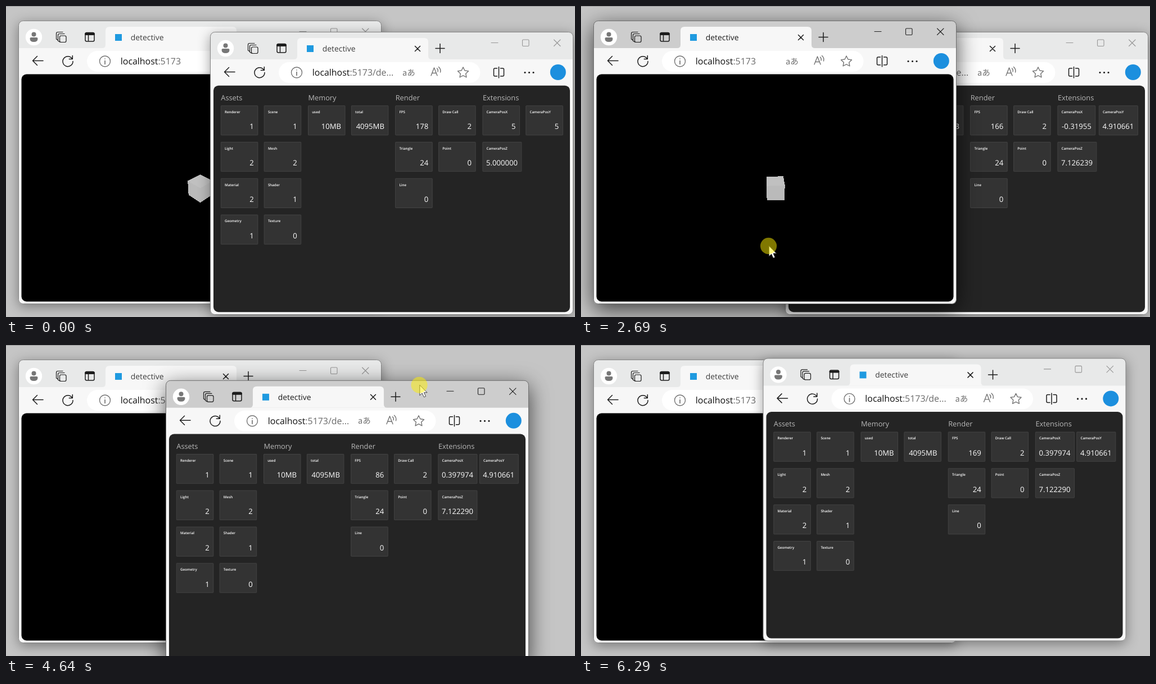
These frames come from a looping animation (1012 by 554 pixels, 6360 ms). An HTML page:

```html
<!DOCTYPE html>
<html lang="en">
<head>
<meta charset="utf-8">
<title>detective</title>
<style>
html, body { margin: 0; width: 100%; height: 100%; overflow: hidden; background: #c5c5c5; }
svg { display: block; width: 1012px; height: 554px; font-family: "Open Sans", "Noto Sans", sans-serif; text-rendering: geometricPrecision; }
.shadow { fill: #c5c5c5; filter: drop-shadow(0 5px 11px rgba(0,0,0,.4)); }
.active .shadow { filter: drop-shadow(0 10px 19px rgba(0,0,0,.7)); }
.bar { fill: #e8e9e9; }
.active .bar { fill: #cdcdcd; }
.sheet { fill: #f7f7f7; }
.edge { fill: none; stroke: #858585; }
.active .edge { stroke: #6e6e6e; }
.icon { fill: none; stroke: #1c1c1c; stroke-width: 1.5; stroke-linecap: round; stroke-linejoin: round; }
.soft { stroke: #737373; stroke-width: 1.4; }
.controls { stroke: #969696; stroke-width: 1.1; }
.active .controls { stroke: #222; }
.tab { font-size: 13.9px; fill: #3c3c3c; }
.active .tab { fill: #1a1a1a; }
.url { font-size: 15.9px; fill: #111; }
.url tspan { fill: #6a6a6a; }
.translate { font: 500 14.5px "Noto Sans CJK JP", "Noto Sans CJK", sans-serif; fill: #707070; }
.head { font-size: 12.8px; fill: #b8b8b8; }
.card rect { fill: #333; stroke: #434343; }
.label { font-size: 6.2px; font-weight: 600; fill: #fff; }
.value { font-size: 13.1px; font-weight: 500; fill: #fff; text-anchor: end; }
</style>
</head>
<body>
<svg id="stage" viewBox="0 0 1012 554">
  <rect width="1012" height="554" fill="#c5c5c5"/>
  <rect width="1012" height="1" fill="#999"/>
  <g id="desk"></g>
  <g id="cursor">
    <path d="M0 0V18.5L4.3 14.5 7.6 21.5 10.7 20.2 7.6 13.4H13.2Z" fill="#fff" stroke="#333" stroke-width=".9"/>
    <circle id="press" cx="-.8" r="14.6" fill="#fff000" opacity=".5"/>
  </g>
</svg>
<script>
const LOOP = 6360, STEPS = 92;
const $ = id => document.getElementById(id);

const frame = (cls, h) => `<rect class="${cls}" x="22.5" y="26.5" width="645" height="${h}" rx="8"/>`;

const chrome = (path, h) => `
  ${frame("shadow", h)}${frame("bar", h)}
  <path class="sheet" d="M22.5 75H667.5V${h + 18.5}q0 8-8 8H30.5q-8 0-8-8Z"/>
  <path class="sheet" d="M171 75q6 0 6-6V44q0-7 7-7H403q7 0 7 7V69q0 6 6 6Z"/>
  ${frame("edge", h)}
  <circle cx="49.500" cy="55.500" r="14.700" fill="#fff"/>
  <g fill="#777"><circle cx="49.500" cy="50.500" r="4"/><path d="M42.500 58q0-2 2-2h10q2 0 2 2 0 6-7 6t-7-6Z"/></g>
  <g class="icon">
    <g stroke-width="1.200"><rect x="95.500" y="53" width="11.500" height="11.500" rx="2.500"/>
    <path d="M92.500 62V52q0-2.500 2.500-2.500h9M89.500 59V49q0-2.500 2.500-2.500h9M92.500 62l3 2M89.500 59l3 2"/></g>
    <rect x="141" y="47.500" width="16" height="15.500" rx="2.500"/>
    <path d="M142 50H156" stroke-width="4"/><path d="M146.500 51V62"/>
    <path d="M66 97.500H47.500M55.500 89.500l-8 8 8 8"/>
    <path d="M117.800 94.200A9 9 0 1 0 119 98.500M118.300 88.500V94.500H112.300"/>
    <path d="M386.500 51.500l9 9M395.500 51.500l-9 9M423 55.500H439M431 47.500V63.500"/>
  </g>
  <rect x="194" y="50" width="12" height="12" fill="#1f9ae0"/>
  <text class="tab" x="221.800" y="61">detective</text>
  <rect x="144" y="80" width="358.500" height="37" rx="18.500" fill="#fff"/>
  <g class="icon soft"><circle cx="176" cy="98.500" r="9.500"/><path d="M176 97.500V103.500M176 94v.1" stroke-width="1.700"/>
    <path d="M415 104l5.500-14 5.500 14M417 99.500h7M425.500 91q2.500 2.500 1.500 6M428.500 88.500q4.500 4 3 9.500"/>
    <path d="M472 89l2.900 6 6.600.9-4.800 4.600 1.200 6.500-5.900-3.100-5.900 3.100 1.200-6.500-4.800-4.600 6.600-.9Z"/>
  </g>
  <text class="url" x="203.800" y="104">localhost<tspan>${path}</tspan></text>
  <text class="translate" x="364" y="103.500">aあ</text>
  <g class="icon"><path d="M532.500 91h-4q-2 0-2 2v10q0 2 2 2h4M538.500 91h4q2 0 2 2v10q0 2-2 2h-4M535.500 88.500V108"/>
    <path d="M582 98.500h.01M589.500 98.500h.01M597 98.500h.01" stroke-width="3.200"/></g>
  <circle cx="640.800" cy="98" r="14" fill="#1c8fde"/>
  <g class="icon controls"><path d="M522 45.500h12M633.500 40l11.500 11.500M645 40l-11.500 11.500"/><rect x="577.500" y="40" width="11.500" height="11.500" rx="1.500"/></g>`;

const groups = {
  Assets: { Renderer: 1, Scene: 1, Light: 2, Mesh: 2, Material: 2, Shader: 1, Geometry: 1, Texture: 0 },
  Memory: { used: "10MB", total: "4095MB" },
  Render: { FPS: 178, "Draw Call": 2, Triangle: 24, Point: 0, Line: 0 },
  Extensions: { CameraPosX: 5, CameraPosY: 5, CameraPosZ: 5 }
};
const CARD_W = 65.5, HOME = [341, 20];

const card = ([label, value], i) => `
  <g class="card" id="${label}" transform="translate(${i % 2 * 76.9} ${177.7 + (i >> 1) * 64.8})">
    <rect width="${CARD_W}" height="52.200" rx=".5"/>
    <text class="label" x="6.700" y="13.300">${label}</text>
    <text class="value" x="${CARD_W - 7}" y="41.800">${value}</text>
  </g>`;

const group = ([title, entries], i) => `
  <g transform="translate(${382.3 + i * 155.2} 0)">
    <text class="head" y="168">${title}</text>${Object.entries(entries).map(card).join("")}
  </g>`;

const panel = `<g transform="translate(${-HOME[0]} ${-HOME[1]})">
  <rect x="369" y="141.700" width="634" height="403.500" rx="9" fill="#242424"/>
  ${Object.entries(groups).map(group).join("")}</g>`;

const scene = `<rect x="27.500" y="121.500" width="635" height="405" rx="9"/><g id="cube" shape-rendering="crispEdges"></g>`;

$("desk").innerHTML =
  `<g id="view">${chrome(":5173", 504)}${scene}</g><g id="stats">${chrome(":5173/de...", 503)}${panel}</g>`;

const clamp = k => Math.min(1, Math.max(0, k));
const mix = (a, b, k) => a.map((v, i) => k === 1 ? b[i] : v + (b[i] - v) * k);
const glide = (from, to, k) => mix(from, to, 1 - (1 - clamp(k)) ** 2.5);

// Linear motion through keys of the form { at, v }
function track(keys, n) {
  let i = 0;
  while (i < keys.length - 2 && n >= keys[i + 1].at) i++;
  const a = keys[i], b = keys[i + 1];
  return mix(a.v, b.v, clamp((n - a.at) / (b.at - a.at)));
}

// Camera poses as [azimuth, height, ground distance]
const pose = (at, x, y, z) => ({ at, v: [Math.atan2(x, z), y, Math.hypot(x, z)] });
const orbit = [
  pose(17, 5, 5, 5),
  pose(23, -3.36929, 4.169182, 6.801894),
  pose(39, -.31955, 4.910661, 7.126239),
  pose(49, .397974, 4.910661, 7.12229)
];
const drag = [{ at: 61, v: HOME }, { at: 70, v: [214, 47] }, { at: 74.5, v: [301.5, -2.6] }];

// The pointer turns the camera at 88 px per radian, then holds the title bar
const orbitHand = n => {
  const [az, y, h] = track(orbit, n);
  return [330.4 - az * 88, 374.4 + Math.atan2(y, h) * 88];
};
const dragHand = n => {
  const [x, y] = track(drag, n);
  return [x + 479.5, y + 33.3];
};
function pointer(n) {
  if (n < 16) return glide([793, 538], orbitHand(0), (n - 1) / 15);
  if (n < 51) return orbitHand(n);
  if (n < 61) return glide(orbitHand(n), dragHand(0), (n - 51) / 10);
  if (n < 80) return dragHand(n);
  return glide(dragHand(n), [76, 545], (n - 80) / 9);
}

// One frame-rate reading per second
const rates = [178, 169, 166, 166, 86, 172, 169];

function setCard(id, text, alignRight) {
  const g = $(id), [rect, , value] = g.children;
  const w = text.length < 8 ? CARD_W : text[0] === "-" ? 66.8 : 69;
  rect.setAttribute("width", w);
  value.setAttribute("x", w - 7);
  value.textContent = text;
  if (alignRight) g.setAttribute("transform", `translate(${142.4 - w} 177.7)`);
}

function drawCube(az, y, h) {
  const r = Math.hypot(y, h), sa = Math.sin(az), ca = Math.cos(az), se = y / r, ce = h / r;
  const eye = [ce * sa, se, ce * ca], up = [-se * sa, ce, -se * ca], side = [ca, 0, -sa];
  const dot = (a, b) => a[0] * b[0] + a[1] * b[1] + a[2] * b[2];
  const focal = 202.5 / Math.tan(Math.PI * 75 / 360);
  const project = p => {
    const s = focal / (r - dot(p, eye));
    return `${(345.5 + dot(p, side) * s).toFixed(2)},${(324.5 - dot(p, up) * s).toFixed(2)}`;
  };
  let out = "";
  for (let axis = 0; axis < 3; axis++) {
    const sign = Math.sign(eye[axis]);
    if (Math.abs(eye[axis]) * r < .5) continue;
    const pts = [[-.5, -.5], [.5, -.5], [.5, .5], [-.5, .5]].map(([u, v]) => {
      const p = [];
      p[axis] = sign / 2;
      p[(axis + 1) % 3] = u;
      p[(axis + 2) % 3] = v;
      return project(p);
    });
    const fill = axis === 0 && sign < 0 ? "#999" : axis === 1 ? "#c0c0c0" : "#bababa";
    out += `<polygon points="${pts.join(" ")}" fill="${fill}"/>`;
  }
  $("cube").innerHTML = out;
}

function draw(n) {
  const viewOn = n >= 16 && n < 55, statsOn = n >= 55 && n < 89;
  $("view").classList.toggle("active", viewOn);
  $("stats").classList.toggle("active", statsOn);
  const front = $(viewOn ? "view" : "stats");
  if ($("desk").lastElementChild !== front) $("desk").append(front);
  // The window trails the hand slightly
  $("stats").setAttribute("transform", `translate(${track(drag, n - .4)})`);

  const [az, y, h] = track(orbit, n);
  drawCube(az, y, h);
  const moved = n > 17;
  const digits = v => v.toFixed(6).slice(0, 8);
  setCard("FPS", String(rates[Math.floor(n / STEPS * LOOP / 1000)]));
  setCard("CameraPosX", moved ? digits(h * Math.sin(az)) : "5");
  setCard("CameraPosY", moved ? digits(y) : "5", true);
  setCard("CameraPosZ", digits(h * Math.cos(az)));

  const pressed = n >= 16 && n < 50 || n === 55 || n >= 61 && n < 78;
  $("cursor").style.display = n >= 1 && n <= 89 ? "" : "none";
  $("cursor").setAttribute("transform", `translate(${pointer(n)})`);
  $("press").style.display = pressed ? "" : "none";
}

const start = performance.now();
let shown = -1;
function tick() {
  const t = (performance.now() - start) % LOOP;
  const n = Math.min(STEPS - 1, Math.floor(t * STEPS / LOOP + .15));
  if (n !== shown) draw(shown = n);
  requestAnimationFrame(tick);
}
tick();
</script>
</body>
</html>
```
